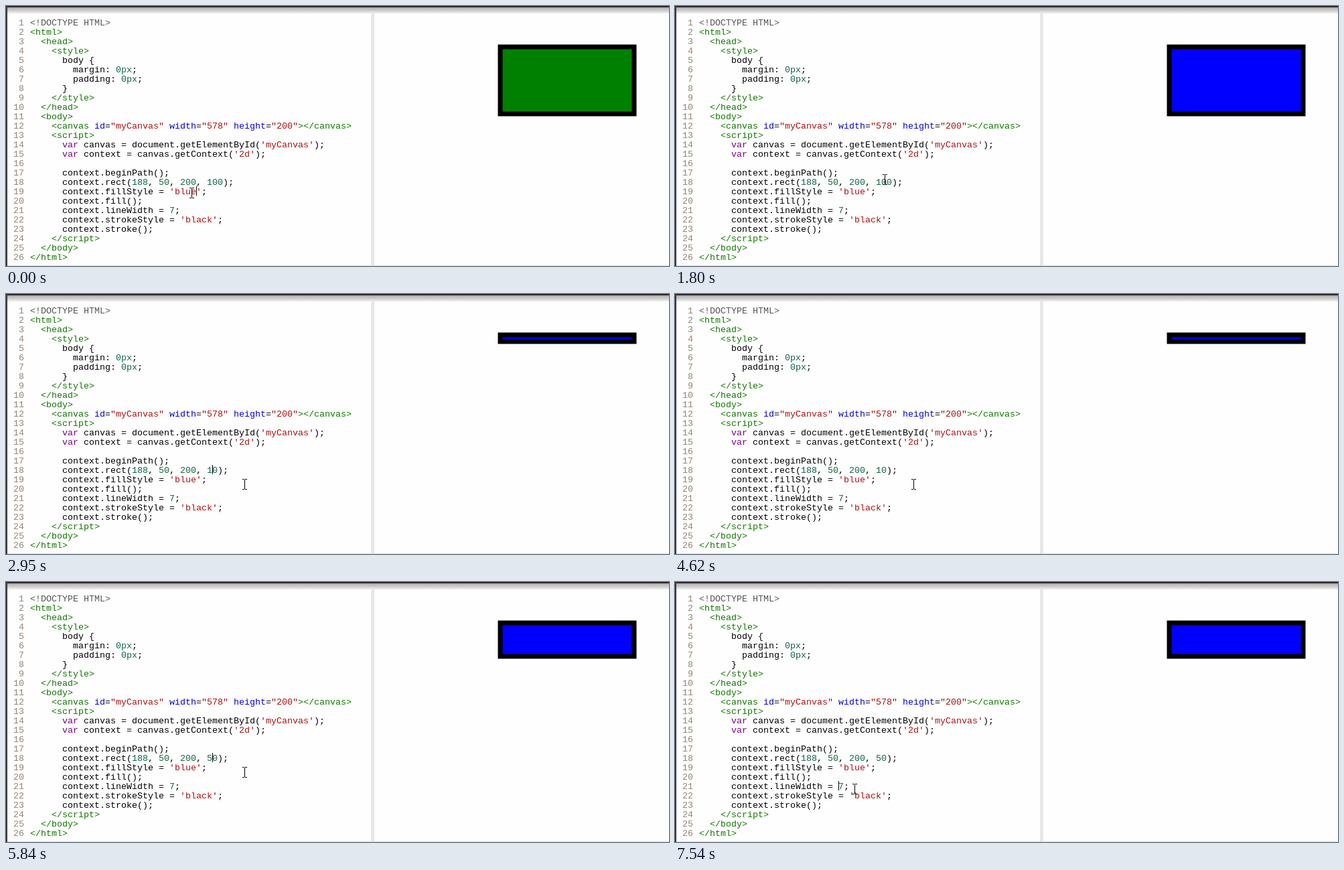
Write an HTML page with a canvas that moves like this. It is 990x388 px and loops after 8000 ms.

```html
<!DOCTYPE html>
<html>
<head>
<meta charset="utf-8">
<style>
  html, body { margin: 0; width: 100%; height: 100%; overflow: hidden; background: #fefefe; }
  canvas { display: block; }
</style>
</head>
<body>
<canvas id="stage" width="990" height="388"></canvas>
<script>
const ctx = document.getElementById('stage').getContext('2d');
const LOOP = 8000, CHAR = 8, LINE = 14, LEFT = 36, TOP = 17, BASELINE = 12;
const BLINK = 650, PREVIEW_DELAY = 280, STEP = 140;

const source = `<!DOCTYPE HTML>
<html>
  <head>
    <style>
      body {
        margin: 0px;
        padding: 0px;
      }
    </style>
  </head>
  <body>
    <canvas id="myCanvas" width="578" height="200"></canvas>
    <script>
      var canvas = document.getElementById('myCanvas');
      var context = canvas.getContext('2d');

      context.beginPath();
      context.rect(188, 50, 200, HEIGHT);
      context.fillStyle = 'blue';
      context.fill();
      context.lineWidth = 7;
      context.strokeStyle = 'black';
      context.stroke();
    <\/script>
  </body>
</html>`;

const token = /(?<meta><!.*>)|(?<tag><\/?\w+|>)|(?<string>'[^']*'|"[^"]*")|(?<attr>\b(?:id|width|height)(?==))|(?<keyword>\bvar\b)|(?<number>\b\d+(?:px)?)|(?<plain>[^\s<>'"\w]+|\w+)/g;
const colors = { meta: '#555', tag: '#117700', string: '#aa1111', attr: '#0000cc',
                 keyword: '#770088', number: '#116644', plain: '#000' };

// Clicks and keystrokes: caret place and the height typed so far.
const edits = [
  { time: -200, line: 19, column: 31, height: '100' },
  { time: 2240, line: 18, column: 35, height: '100' },
  { time: 2670, line: 18, column: 34, height: '10' },
  { time: 5300, line: 18, column: 33, height: '0' },
  { time: 5560, line: 18, column: 34, height: '50' },
  { time: 7410, line: 21, column: 26, height: '50' }
];

// Turning points of the mouse: time, x, y.
const path = [
  [0, 277, 279], [150, 277, 279], [550, 252, 292], [820, 285, 275], [960, 285, 275],
  [1670, 328, 258], [1800, 313, 259], [2100, 309, 259], [2240, 356, 284], [6000, 356, 284],
  [6840, 170, 312], [7120, 234, 305], [7540, 268, 309], [LOOP, 268, 309]
];

function rect(x, y, w, h, color) {
  ctx.fillStyle = color;
  ctx.fillRect(x, y, w, h);
}

function drawFrame() {
  rect(0, 0, 990, 388, '#fefefe');
  const bar = ctx.createLinearGradient(0, 2, 0, 11);
  bar.addColorStop(0, '#aaa');
  bar.addColorStop(1, '#eee');
  rect(0, 2, 990, 9, bar);
  rect(545, 11, 5, 377, '#e8e8e8');
  rect(0, 387, 990, 1, '#ddd');
  rect(0, 0, 990, 2, '#2d2929');
  rect(0, 0, 2, 388, '#3a3737');
}

function drawCode(height) {
  ctx.font = '13.333px "Liberation Mono", monospace';
  source.replace('HEIGHT', height).split('\n').forEach((text, i) => {
    const y = TOP + BASELINE + i * LINE;
    ctx.textAlign = 'right';
    ctx.fillStyle = '#948678';
    ctx.fillText(i + 1, 27, y);
    ctx.textAlign = 'left';
    for (const match of text.matchAll(token)) {
      const kind = Object.keys(colors).find(name => match.groups[name]);
      ctx.fillStyle = colors[kind];
      ctx.fillText(match[0], LEFT + match.index * CHAR, y);
    }
  });
}

// The preview follows typing after a pause and skips an empty height.
function drawPreview(t) {
  const shown = edits.findLast(e => e.time <= t - PREVIEW_DELAY && +e.height) || edits[0];
  ctx.beginPath();
  ctx.rect(738, 61, 200, +shown.height);
  ctx.fillStyle = t < 150 ? '#008000' : '#0000ff';
  ctx.fill();
  ctx.lineWidth = 7;
  ctx.strokeStyle = '#000';
  ctx.stroke();
}

function drawCaret(t, { time, line, column }) {
  const visible = Math.floor((t - time) / BLINK) % 2 === 0;
  if (visible) rect(LEFT + column * CHAR, TOP + (line - 1) * LINE, 1, LINE, '#000');
}

// The mouse moves in visible steps between its turning points.
function drawPointer(t) {
  const i = path.findLastIndex(point => point[0] <= t);
  const [t0, x0, y0] = path[i], [t1, x1, y1] = path[i + 1];
  const steps = Math.max(1, Math.round((t1 - t0) / STEP));
  const progress = Math.floor((t - t0) / (t1 - t0) * steps) / steps;
  const x = Math.round(x0 + (x1 - x0) * progress);
  const y = Math.round(y0 + (y1 - y0) * progress);
  rect(x, y - 7, 1, 14, '#000');
  for (const end of [y - 8, y + 7]) {
    rect(x - 3, end, 3, 1, '#000');
    rect(x + 1, end, 3, 1, '#000');
  }
}

function draw() {
  const t = performance.now() % LOOP;
  const edit = edits.findLast(e => e.time <= t);
  drawFrame();
  drawCode(edit.height);
  drawPreview(t);
  drawCaret(t, edit);
  drawPointer(t);
  requestAnimationFrame(draw);
}
draw();
</script>
</body>
</html>
```
